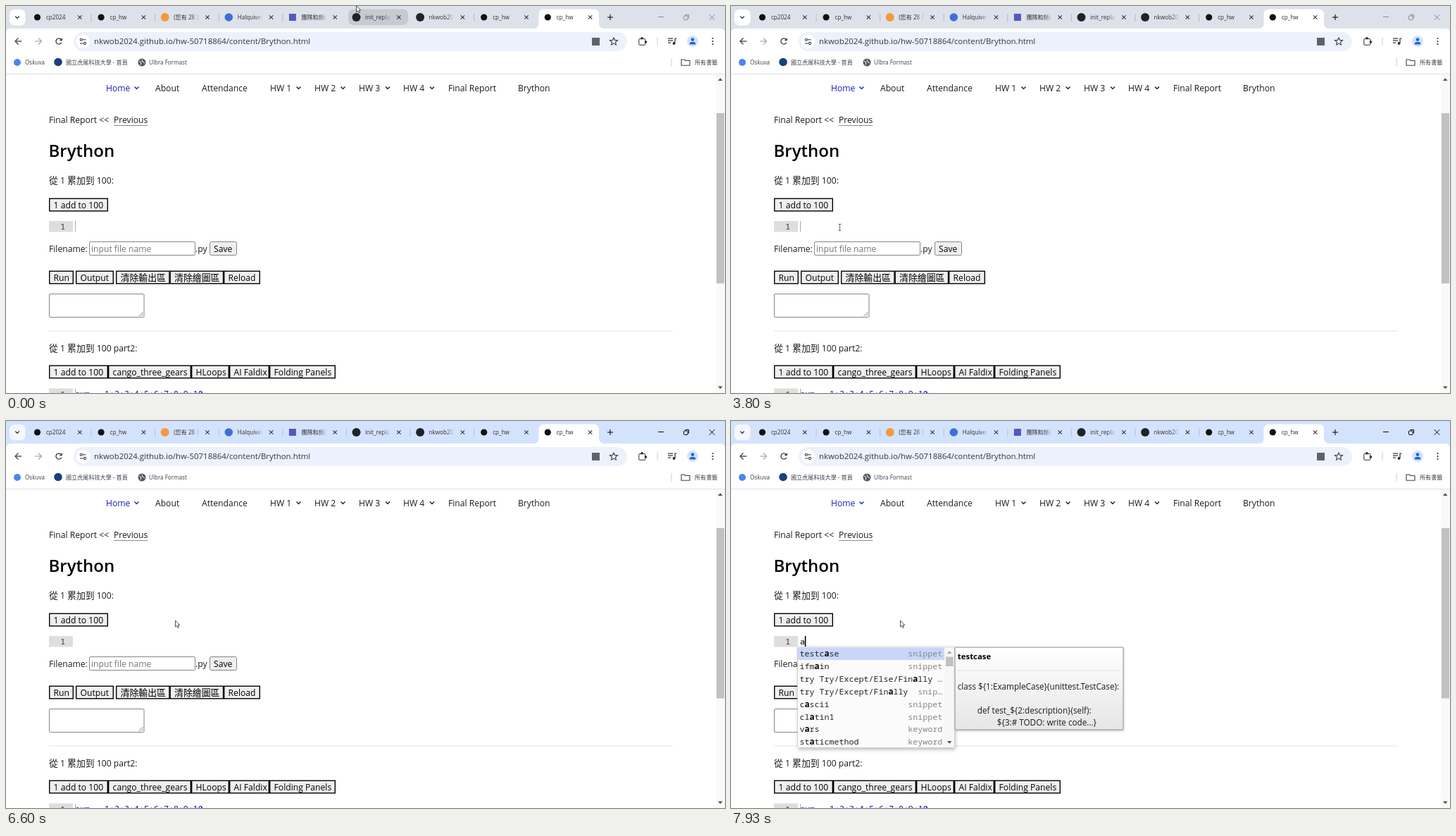
An HTML page with a canvas that plays this animation: 1021 by 549 pixels, repeating every 8000 ms.

```html
<!DOCTYPE html>
<html lang="zh-Hant">
<head>
<meta charset="utf-8">
<title>Brython</title>
<style>
html, body { margin: 0; width: 100%; height: 100%; overflow: hidden; background: #fff; }
canvas { display: block; width: 1021px; height: 549px; }
</style>
</head>
<body>
<canvas id="stage" width="1021" height="549"></canvas>
<script>
const ctx = document.getElementById('stage').getContext('2d');
const LOOP = 8000;
const SANS = '"Open Sans", "Noto Sans", sans-serif';
const CJK = '"Noto Sans CJK TC", "Noto Sans CJK JP", sans-serif';
const MONO = '"Noto Sans Mono", monospace';
const INK = '#1b1b1b', BODY = 12.15, SMALL = 8.1;

function box(x, y, w, h, color) {
  ctx.fillStyle = color;
  ctx.fillRect(x, y, w, h);
}

function round(x, y, w, h, r, fill, stroke) {
  ctx.beginPath();
  ctx.roundRect(x, y, w, h, r);
  if (fill) { ctx.fillStyle = fill; ctx.fill(); }
  if (stroke) { ctx.strokeStyle = stroke; ctx.lineWidth = 1; ctx.stroke(); }
}

function disc(x, y, r, color) {
  ctx.fillStyle = color;
  ctx.beginPath();
  ctx.arc(x, y, r, 0, 7);
  ctx.fill();
}

function ring(x, y, r, color, width = 1.2, from = 0, to = 7) {
  ctx.strokeStyle = color;
  ctx.lineWidth = width;
  ctx.beginPath();
  ctx.arc(x, y, r, from, to);
  ctx.stroke();
}

// Points are x, y pairs relative to the origin.
function trace(x, y, pts) {
  ctx.beginPath();
  for (let i = 0; i < pts.length; i += 2) ctx.lineTo(x + pts[i], y + pts[i + 1]);
}

function line(x, y, pts, color = INK, width = 1.3) {
  trace(x, y, pts);
  ctx.strokeStyle = color;
  ctx.lineWidth = width;
  ctx.stroke();
}

function shape(x, y, pts, color) {
  trace(x, y, pts);
  ctx.fillStyle = color;
  ctx.fill();
}

// Draws Latin and Chinese runs in their own fonts; returns the end x.
function text(str, x, y, { size = BODY, color = INK, weight = 400 } = {}) {
  ctx.fillStyle = color;
  for (const run of str.match(/[\u3000-\u9fff]+|[^\u3000-\u9fff]+/g)) {
    const han = run > '\u3000';
    const px = han && size > 10 ? size * 1.06 : size;
    ctx.font = `${han ? 300 : weight} ${px}px ${han ? CJK : SANS}`;
    ctx.fillText(run, x, y);
    x += ctx.measureText(run).width;
  }
  return x;
}

function mono(str, x, y, color = INK, weight = 400) {
  ctx.font = `${weight} 11.67px ${MONO}`;
  ctx.fillStyle = color;
  ctx.fillText(str, x, y);
  return x + ctx.measureText(str).width;
}

const chevron = (x, y, color, s = 3) => line(x, y, [-s, -s / 2, 0, s / 2, s, -s / 2], color, 1.3);

function cross(x, y, s, color, width = 1.1) {
  line(x, y, [-s, -s, s, s], color, width);
  line(x, y, [s, -s, -s, s], color, width);
}

/* ---------- browser frame ---------- */

const tabs = [
  ['cp2024', 'page'], ['cp_hw', 'page'], ['(您有 28 封', 'mail'], ['Halquiven', 'suite'],
  ['團隊和頻道', 'team'], ['init_replay', 'code'], ['nkwob2024', 'code'], ['cp_hw', 'page'], ['cp_hw', 'page']
];
const favicons = {
  page: (x, y) => disc(x, y, 4.6, '#111'),
  mail: (x, y) => disc(x, y, 6, '#f39a3c'),
  suite: (x, y) => disc(x, y, 5.8, '#3f6fd8'),
  team: (x, y) => box(x - 5, y - 5, 10, 10, '#5059c0'),
  code: (x, y) => disc(x, y, 6, '#1f2328')
};

// The selected tab flares into the toolbar at its foot.
function drawSelectedTab(left, right, top, foot, r) {
  ctx.fillStyle = '#fff';
  ctx.beginPath();
  ctx.moveTo(left - r, foot);
  ctx.arcTo(left, foot, left, top, r);
  ctx.arcTo(left, top, right, top, r);
  ctx.arcTo(right, top, right, foot, r);
  ctx.arcTo(right, foot, right + r, foot, r);
  ctx.lineTo(right + r, foot);
  ctx.fill();
}

function drawTabs(active, hover) {
  box(0, 0, 1021, 40, active ? '#d3e3fd' : '#dde2ea');
  round(5, 5, 22.5, 22.5, 6.5, active ? '#f4f8fe' : '#fff');
  chevron(16, 16, INK, 2.7);
  if (hover > 0) {
    ctx.globalAlpha = hover;
    round(486, 4.5, 85, 22.5, 7, '#c7cbd1');
    ctx.globalAlpha = 1;
  }
  drawSelectedTab(756.5, 842, 4.5, 32, 7);

  tabs.forEach(([title, kind], i) => {
    const x = 44.5 + i * 90.6;
    favicons[kind](x, 16);
    const start = x + 12.5;
    let color = '#2b2e33';
    if (i > 1 && i < 7) {
      color = ctx.createLinearGradient(start + 25, 0, start + 36, 0);
      color.addColorStop(0, '#2b2e33');
      color.addColorStop(1, 'rgba(43,46,51,0)');
    }
    text(title, start, 19, { size: SMALL, color });
    cross(x + 60.3, 16, 2.7, '#33363a', 1.1);
    const hidden = hover > 0.5 && (i === 4 || i === 5);
    if (i < 7 && !hidden) box(x + 76, 11, 1, 11, active ? '#a9c0ea' : '#b4b9c2');
  });

  line(858, 16, [-4, 0, 4, 0], INK, 1.2);
  line(858, 16, [0, -4, 0, 4], INK, 1.2);
  const ctl = active ? '#000' : '#85898f';
  line(930, 15.5, [-4, 0, 4, 0], ctl, 1);
  round(962.5, 14, 5.5, 5.5, 1, null, ctl);
  line(964.5, 12.5, [0, 0, 5, 0, 5, 5], ctl, 1);
  cross(1002.5, 16, 3.8, ctl, 1);
}

function drawToolbar() {
  round(0, 32, 1021, 65, [6, 6, 0, 0], '#fff');
  for (const [x, dir, color] of [[17.5, 1, '#3c4043'], [46, -1, '#a9acb0']]) {
    line(x, 50, [-4.5 * dir, 0, 4.8 * dir, 0], color);
    line(x, 50, [0, -4.5, -4.5 * dir, 0, 0, 4.5], color);
  }
  ring(75, 50, 4, '#3c4043', 1.4, 0.5, 5.6);
  shape(75, 50, [4.8, -5, 4.8, -0.7, 0.6, -0.7], '#3c4043');

  round(96, 37, 786, 27, 13.5, '#ecf2fb');
  disc(109.5, 50.5, 9.8, '#fff');
  ring(106.8, 47.8, 1.6, '#3c4043', 1.1);
  line(109, 47.8, [0, 0, 4.5, 0], '#3c4043', 1.1);
  ring(112, 53, 1.6, '#3c4043', 1.1);
  line(105, 53, [0, 0, 4.5, 0], '#3c4043', 1.1);
  text('nkwob2024.github.io/hw-50718864/content/Brython.html', 125, 54, { size: 11.42, color: '#33373c' });

  box(832, 45, 11, 11, '#5f6368');
  const star = [];
  for (let i = 0; i <= 10; i++) {
    const a = i * Math.PI / 5 - Math.PI / 2, r = i % 2 ? 2.6 : 5.8;
    star.push(Math.cos(a) * r, Math.sin(a) * r);
  }
  line(863, 50.5, star, '#3c4043', 1.1);

  round(898.8, 46.5, 9, 8.8, 1, null, '#2b2e33');
  disc(903, 45.8, 1.8, '#2b2e33');
  disc(908.5, 51, 1.8, '#2b2e33');
  box(924.5, 44, 1.2, 12, '#c4dafc');
  for (let i = 0; i < 3; i++) box(940, 45.5 + i * 3, i === 2 ? 4 : 7, 1.2, '#2b2e33');
  disc(948.5, 53, 1.9, '#2b2e33');
  line(950, 53, [0, 0, 0, -7, 2.5, -7], '#2b2e33', 1.2);
  disc(975, 50, 8, '#d3e3fd');
  disc(975, 47.6, 2.3, '#1a65d6');
  round(970.7, 51, 8.6, 3.6, [3, 3, 0, 0], '#1a65d6');
  for (const dy of [-4, 0, 4]) disc(1003.5, 50 + dy, 1.1, '#2b2e33');

  const label = { size: SMALL, color: '#3a3e43' };
  disc(16, 80, 5, '#4a86ee');
  text('Oskuva', 27, 83, label);
  disc(74, 79.5, 5.8, '#18407c');
  text('國立虎尾科技大學 - 首頁', 85, 83, label);
  disc(193, 80, 5.5, '#55595e');
  line(193, 80, [-4, -2, -1, 0, -2, 3.5], '#fff', 1);
  line(193, 80, [0, -4, 1, -1, 4, 1], '#fff', 1);
  text('Ulbra Formast', 203, 83, label);
  box(944.5, 74, 1.2, 12, '#c4dafc');
  line(965, 80, [-6, -4, -1.5, -4, 0, -2.5, 6, -2.5, 6, 4.3, -6, 4.3, -6, -4.5], '#3c4043', 1.1);
  text('所有書籤', 978, 83, label);
  box(0, 96, 1021, 1, '#dde1e6');
}

/* ---------- page ---------- */

function button(label, x, y, w, h = 19) {
  box(x, y, w, h, '#000');
  box(x + 1.4, y + 1.4, w - 2.8, h - 2.8, '#efefef');
  text(label, x + 6.6, y + 14.5, { color: '#000' });
}

function gutter(y) {
  box(61, y, 34, 15.5, '#dedede');
  mono('1', 77.3, y + 12, '#333');
}

function drawPage(inputHover) {
  const menu = [['Home', 142, 185.5], ['About', 212], ['Attendance', 278], ['HW 1', 375, 415.5], ['HW 2', 438, 478.5],
    ['HW 3', 501, 542], ['HW 4', 564, 605], ['Final Report', 628], ['Brython', 727]];
  for (const [name, x, arrow] of menu) {
    const color = name === 'Home' ? '#1a1ac4' : INK;
    text(name, x, 121, { color });
    if (arrow) chevron(arrow, 116, color, 3);
  }
  text('Final Report <<', 61, 166);
  const stop = text('Previous', 153, 166);
  box(153, 169, stop - 153, 1, '#8a8a8a');
  text('Brython', 60.5, 214, { size: 24, weight: 600, color: '#000' });

  text('從 1 累加到 100:', 61, 252);
  button('1 add to 100', 61, 272.5, 84);
  gutter(305);

  text('Filename:', 61, 349);
  round(118.5, 334.5, 150, 19, 1.6, '#fff', inputHover ? '#4f4f4f' : '#858585');
  text('input file name', 121, 349, { color: '#757575' });
  text('.py', 269, 349);
  round(289.5, 334.5, 38, 19, 2, '#efefef', '#858585');
  text('Save', 295, 349, { color: '#000' });

  button('Run', 61, 375.5, 35);
  button('Output', 99, 375.5, 54);
  button('清除輸出區', 156, 375.5, 76.7);
  button('清除繪圖區', 232.5, 375.5, 76.7);
  button('Reload', 309, 375.5, 52);
  round(61.5, 408.5, 134.5, 33, 1.5, '#fff', '#858585');
  line(194.5, 440, [-6, 0, 0, -6], '#666', 0.8);
  line(194.5, 440, [-3, 0, 0, -3], '#666', 0.8);
  box(61, 460.5, 886, 1, '#e6e6e6');

  text('從 1 累加到 100 part2:', 61, 490);
  button('1 add to 100', 61, 509.5, 84);
  button('cango_three_gears', 145, 509.5, 118);
  button('HLoops', 263, 509.5, 54);
  button('AI Faldix', 317, 509.5, 57);
  button('Folding Panels', 374, 509.5, 94);
  gutter(542.5);
  box(98, 543, 1, 6, '#aaa');
  let x = mono('sum ', 98, 554, '#2a2fc0');
  x = mono('= ', x, 554, '#687687');
  for (const part of '1+2+3+4+5+6+7+8+9+10'.split(/(\+)/))
    x = mono(part, x, 554, part === '+' ? '#687687' : '#0000cd');

  box(1008, 97, 13, 452, '#f9f9f9');
  box(1009, 152, 11, 241.5, '#c1c1c1');
  shape(1014.3, 104, [-3.3, 2, 0, -1.8, 3.3, 2], '#505050');
  shape(1014.3, 541.5, [-3.3, -2, 0, 1.8, 3.3, -2], '#505050');
}

/* ---------- completion list ---------- */

// The bar marks the matched letter.
const hints = [
  ['testc|ase', 'snippet'], ['ifm|ain', 'snippet'], ['try Try/Except/Else/Fin|ally', '…'],
  ['try Try/Except/Fin|ally', 'snip…'], ['c|ascii', 'snippet'], ['cl|atin1', 'snippet'],
  ['v|ars', 'keyword'], ['st|aticmethod', 'keyword']
];

function panel(x, y, w, h, fill, stroke, shadow) {
  ctx.save();
  ctx.shadowColor = 'rgba(0,0,0,.28)';
  ctx.shadowBlur = shadow;
  ctx.shadowOffsetX = shadow / 4;
  ctx.shadowOffsetY = shadow / 3;
  box(x, y, w, h, '#fff');
  ctx.restore();
  round(x + 0.5, y + 0.5, w - 1, h - 1, 1, fill, stroke);
}

function drawHints() {
  panel(94, 320.5, 224, 143.5, '#fbfbfb', '#d0d0d0', 5);
  box(95, 321.5, 208, 17.5, '#c9d6fa');
  hints.forEach(([word, kind], i) => {
    const y = 334 + i * 17.9, [head, tail] = word.split('|');
    let x = mono(head, 97.5, y, '#222');
    x = mono('a', x, y, '#000', 700);
    mono(tail.slice(1), x, y, '#222');
    mono(kind, 300.3 - kind.length * 7, y, '#85878b');
  });
  box(303, 321.5, 14, 141.5, '#f7f7f7');
  box(305, 334.5, 10.5, 13.5, '#c1c1c1');
  shape(310.2, 328, [-3.2, 2, 0, -1.8, 3.2, 2], '#a3a3a3');
  shape(310.2, 456, [-3.2, -2, 0, 1.8, 3.2, -2], '#505050');
}

function drawDoc() {
  const shade = ctx.createLinearGradient(0, 321, 0, 438);
  shade.addColorStop(0, '#fff');
  shade.addColorStop(1, '#e6e6e6');
  panel(317.5, 320.5, 240, 118, shade, '#8c8c8c', 3);
  text('testcase', 321.8, 338, { size: 11.4, weight: 700, color: '#000' });
  box(322, 353.5, 231, 1, '#dedede');
  text('class ${1:ExampleCase}(unittest.TestCase):', 321.8, 381, { size: 11.7 });
  text('def test_${2:description}(self):', 349.8, 415, { size: 11.7 });
  text('${3:# TODO: write code...}', 377.8, 432, { size: 11.7 });
}

/* ---------- pointer and time ---------- */

// Each path is a cubic curve, sampled in equal time steps.
const moves = [
  { from: 70, to: 670, steps: 8, lead: 1, path: [498, 0, 640, 90, 350, 190, 466, 233] },
  { from: 3270, to: 3800, steps: 8, lead: 0, path: [466, 234, 380, 330, 200, 380, 154, 314] },
  { from: 4000, to: 4400, steps: 5, lead: 0, path: [154, 314, 180, 311, 230, 290, 240.5, 283] }
];

function pointerAt(t) {
  let pos = [497.5, -0.5];
  for (const { from, to, steps, lead, path } of moves) {
    if (t < from) break;
    const gap = (to - from) / (steps - lead);
    const p = Math.min(1, (Math.floor((t - from) / gap + 0.001) + lead) / steps);
    const u = p * p * (3 - 2 * p), v = 1 - u;
    const at = k => v ** 3 * path[k] + 3 * v * v * u * path[k + 2] + 3 * v * u * u * path[k + 4] + u ** 3 * path[k + 6];
    pos = [at(0), at(1)];
  }
  return pos;
}

function drawPointer(x, y, beam) {
  if (beam) {
    line(x + 0.5, y, [0, -4.2, 0, 4.2], '#444', 0.8);
    for (const d of [-4.5, 4.5]) line(x + 0.5, y, [-1.8, d, 1.8, d], '#444', 0.8);
    return;
  }
  const arrow = [0, 0, 0, 9, 2, 7.2, 3.5, 10.4, 5, 9.7, 3.6, 6.6, 6.2, 6.4, 0, 0];
  shape(x, y, arrow, '#fff');
  line(x, y, arrow, '#222', 0.8);
}

function drawCaret(t, typed) {
  if (t < 4000) return box(98, 305, 1.2, 15, '#b0b0b0');
  const since = t - (typed ? 6930 : 4000);
  if (since % 1000 < 600) box(typed ? 104.8 : 98, 305, 1.6, 15, '#000');
}

function render(t) {
  const [x, y] = pointerAt(t);
  const typed = t >= 6930;
  const inInput = x > 118 && x < 269 && y > 334 && y < 354;
  const inEditor = x > 95 && x < 947 && y > 305 && y < 320.5;
  box(0, 0, 1021, 549, '#fff');
  drawTabs(t >= 4000, Math.min(1, Math.max(0, 1 - (t - 70) / 250)));
  drawToolbar();
  drawPage(inInput);
  if (typed) {
    mono('a', 98, 317, '#000');
    drawHints();
  }
  if (t >= 7000) drawDoc();
  drawCaret(t, typed);
  drawPointer(x, y, inInput || inEditor);
}

const start = performance.now();
function tick() {
  render((performance.now() - start) % LOOP);
  requestAnimationFrame(tick);
}
tick();
</script>
</body>
</html>
```
